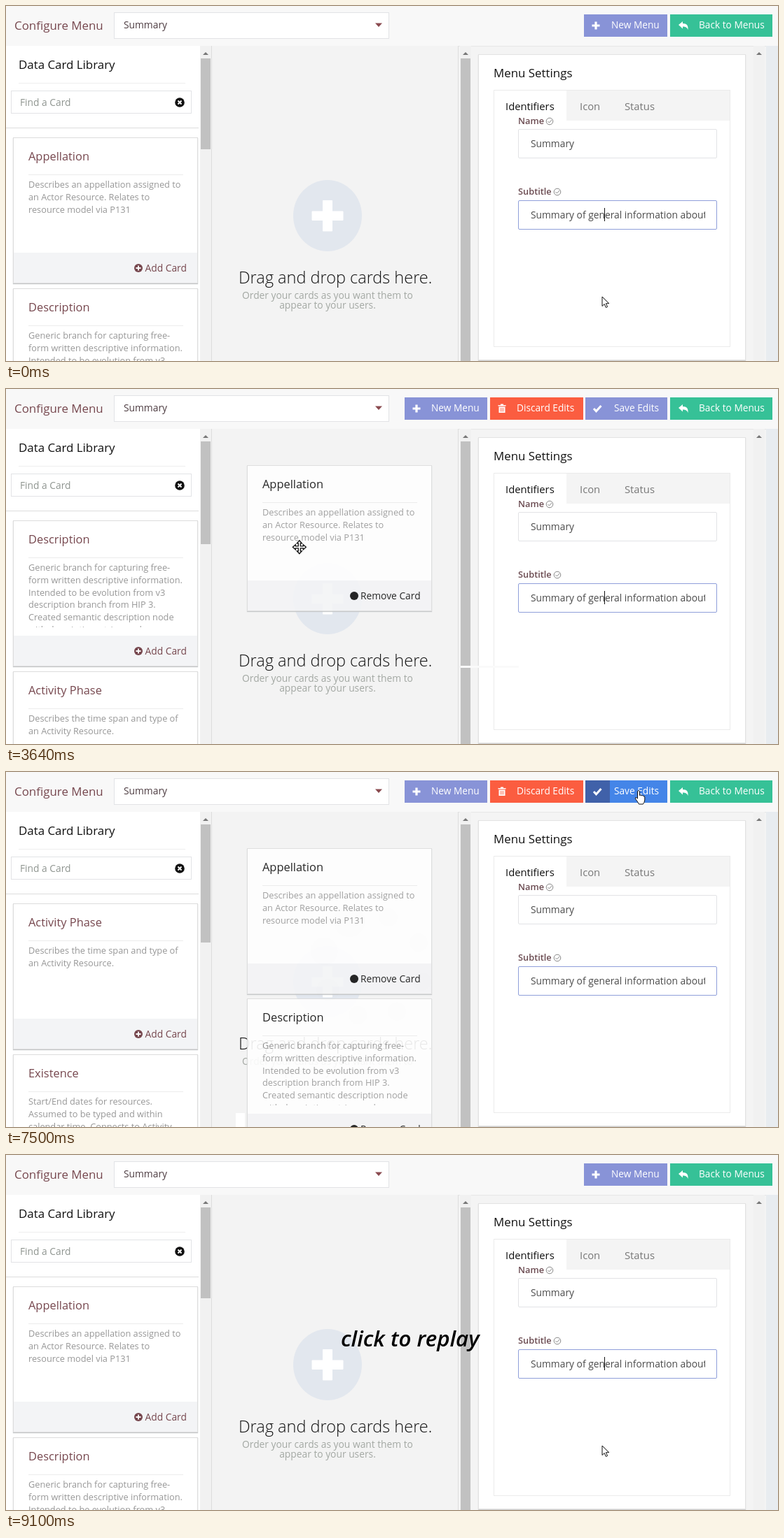
An HTML page that plays this animation: 1102x508 px, repeating every 9.16 s.

```html
<!DOCTYPE html>
<html lang="en">
<head>
<meta charset="utf-8">
<title>Configure Menu</title>
<style>
html, body { margin: 0; width: 100%; height: 100%; overflow: hidden; }
#stage {
  --ink: #111; --brand: #76474e; --dim: #979797;
  position: relative; width: 1102px; height: 508px; overflow: hidden;
  background: #f4f4f4; color: var(--ink); font-family: "Open Sans", sans-serif;
}
#stage.busy { --ink: #640c18; --brand: #640c18; --dim: #858585; }
#stage div, #stage svg { position: absolute; box-sizing: border-box; }
#stage svg { overflow: visible; }
.t { white-space: nowrap; transform: translateY(-50%); line-height: 1.4; }
.field { background: #fff; border: 1px solid #e2e3e6; }
.busy .field { border-color: #f3f3f3; }
.card {
  left: 0; top: 0; width: 264px; height: 209px; background: #fff;
  border: 1px solid #dcdcdc; box-shadow: 0 1px 1px #c4c6c8;
  --title: var(--brand);
}
.busy .card { border-color: #f3f3f3; }
.card.hot { --title: var(--ink); }
.card.dropped { opacity: .9; }
.card .t { color: var(--title); }
.body {
  left: 21px; top: 58px; width: 240px; height: 94px; overflow: hidden;
  font-size: 12.75px; line-height: 17.8px; white-space: pre; color: var(--dim);
}
.foot { left: 0; bottom: 0; width: 100%; height: 43px; background: #f3f4f6; }
.card .remove, .card.dropped .add { display: none; }
.card.dropped .remove { display: block; }
.btn { top: 12px; height: 32px; background: var(--c); color: #fff; }
.btn .icon { left: 0; top: 0; height: 32px; background: var(--i, transparent); }
.blue { --c: #8893d7; }
.red { --c: #fb5d40; }
.green { --c: #36c197; }
.save.hover { --c: #4485e8; --i: #4061a9; }
.busy .blue { --c: #7fbfd7; --i: #4a6bd2; }
.busy .red { --c: #f2964f; --i: #ec8b47; }
.busy .green { --c: #42ebbb; }
.busy .btn { color: #c8cccc; }
#veil { inset: 0; background: rgba(128, 128, 128, .45); }
</style>
</head>
<body>
<div id="stage"></div>
<script>
const LOOP = 9160;
const stage = document.getElementById('stage');

const box = (x, y, w, h, css, inner = '', attrs = '') =>
  `<div ${attrs} style="left:${x}px;top:${y}px;width:${w}px;height:${h}px;${css}">${inner}</div>`;
const fill = (x, y, w, h, color, attrs) => box(x, y, w, h, `background:${color}`, '', attrs);
const text = (x, y, size, str, css = '', attrs = '') =>
  `<div class="t" ${attrs} style="left:${x}px;top:${y}px;font-size:${size}px;${css}">${str}</div>`;
const svg = (x, y, shapes, attrs = '') =>
  `<svg ${attrs} width="1" height="1" style="left:${x}px;top:${y}px">${shapes}</svg>`;
const path = (d, paint) => `<path d="${d}" ${paint}/>`;

const ICON = {
  plus: path('M-1.6-5.5h3.2v3.9h3.9v3.2h-3.9v3.9h-3.2v-3.9h-3.9v-3.2h3.9z', 'fill="#fff"'),
  trash: path('M-5.5-5h3.5v-1.5h4V-5h3.5v1.5h-11zM-4.5-2.5h9V6h-9z', 'fill="#fff"') +
    path('M-2-1V4.5M0-1V4.5M2-1V4.5', 'stroke="#fb5d40" stroke-width=".8"'),
  check: path('M-5 0L-1.5 3.8 5.5-4', 'fill="none" stroke="#fff" stroke-width="3"'),
  reply: path('M-7-1L-1-6v3C5-3 7 0 6.5 6 5 2.5 3 1.5-1 1.5V4.5z', 'fill="#fff"')
};

function button(x, w, color, icon, label, pad) {
  return `<div class="btn ${color}" style="left:${x}px;width:${w}px">` +
    `<div class="icon" style="width:${pad - 6}px"></div>` +
    svg(icon === 'reply' ? 19 : 17, 15.5, ICON[icon]) + text(pad, 15, 13.7, label) + '</div>';
}

function scrollbar(x, attrs) {
  return fill(x, 57, 16, 451, '#f1f1f1') +
    svg(x + 8, 68, path('M-4 2L0-2 4 2z', 'fill="#777"')) +
    (attrs ? fill(x + 1, 75, 14, 433, '#c1c1c1', attrs) : '');
}

function card(id, title, body) {
  const action = (x, label, cls, mark) =>
    `<div class="${cls}">${svg(x, 186, `<circle r="6" fill="var(--title)"/>${mark}`)}` +
    `${text(x + 9.5, 186, 13.8, label)}</div>`;
  const plus = path('M-3.5 0h7M0-3.5v7', 'stroke="#fff" stroke-width="1.8"');
  return `<div class="card" id="${id}">${text(21, 25.5, 16.4, title)}` +
    fill(21, 52, 221, 1, '#ececec') + `<div class="body">${body}</div><div class="foot"></div>` +
    action(178, 'Add Card', 'add', plus) + action(151.5, 'Remove Card', 'remove', '') + '</div>';
}

const tick = (x, y) => svg(x, y, '<circle r="4.8" fill="none" stroke="#888"/>' +
  path('M-2.5 0l2 2 3.5-4', 'fill="none" stroke="#888"'));
const label = (y, str, iconX) =>
  text(731, y, 12.8, str, 'font-weight:600;color:#6a4a50') + tick(iconX, y);

const header = fill(0, 0, 1102, 57, '#f8f8f8') + fill(0, 57, 1102, 1, '#e6e6e6') +
  text(12, 27.5, 16.9, 'Configure Menu', 'color:var(--brand)') +
  box(154, 9, 393, 38, '', text(13, 17, 13.8, 'Summary', 'color:#4c3b40') +
    svg(376.5, 17, path('M-5-2.5H5L0 3z', 'fill="#8a4a4f"')), 'class="field"');

const library = fill(0, 57, 277, 451, '#fff') + text(18, 83.5, 16.9, 'Data Card Library') +
  fill(18, 110, 238, 1, '#eee') +
  box(7, 121, 258, 33, '', text(12, 16, 13.8, 'Find a Card', 'color:#8f9590') +
    svg(240, 16, '<circle r="6.8" fill="var(--ink)"/>' +
      path('M-2.5-2.5l5 5M2.5-2.5l-5 5', 'stroke="#fff" stroke-width="1.9"')), 'class="field"') +
  fill(0, 174, 275, 1, '#ddd') + scrollbar(277, 'id="thumb"') + fill(293, 57, 1, 451, '#ddd');

const hint = (y, str) =>
  text(459, y, 13.8, str, 'color:#a3a8a3;transform:translate(-50%,-50%)');
const dropArea = fill(294, 57, 352, 451, '#f3f3f3') +
  svg(459, 300, '<ellipse rx="49" ry="51" fill="#e2e7ee"/>' +
    path('M-6.5-21.5h13v15.5h15.5v12.5h-15.5v15.5h-13v-15.5h-15.5v-12.5h15.5z',
      'fill="#fff" stroke="#fff" stroke-linejoin="round"')) +
  text(332, 388, 23.5, 'Drag and drop cards here.', 'font-weight:300') +
  hint(413.5, 'Order your cards as you want them to') + hint(428, 'appear to your users.') +
  fill(645, 57, 1, 451, '#ddd') + scrollbar(648, 'class="full"');

const settings = scrollbar(1067) + fill(1085, 57, 17, 451, '#e8ecf0') +
  box(674, 69, 382, 438, 'background:#fff;border:1px solid #e2e2e2;box-shadow:0 1px 1px #d0d0d0') +
  text(696, 95.5, 16.9, 'Menu Settings') +
  box(696, 120, 338, 368, 'border:1px solid #ebebeb') +
  fill(800, 121, 233, 43, '#f4f4f4') +
  text(713, 143, 14.8, 'Identifiers') + text(819, 143, 14.8, 'Icon', 'color:#777') +
  text(883, 143, 14.8, 'Status', 'color:#777') +
  label(165, 'Name', 776) + label(266, 'Subtitle', 787) +
  box(731, 176, 284, 42, 'border-radius:2px', text(17, 20, 13.8, 'Summary', 'color:#4a4a4a'), 'class="field"') +
  box(731, 278, 284, 42, 'border-radius:2px',
    box(17, 0, 249, 40, 'overflow:hidden',
      text(0, 20, 13.8, 'Summary of general information about', 'color:#4a4a4a')),
    'class="field" id="subtitle"') +
  fill(854, 289, 1, 19, '#111', 'id="caret"');

const cards =
  card('phase', 'Activity Phase', 'Describes the time span and type of\nan Activity Resource.') +
  card('existence', 'Existence', 'Start/End dates for resources.\nAssumed to be typed and within\ncalendar time. Connects to Activity') +
  card('appellation', 'Appellation', 'Describes an appellation assigned to\nan Actor Resource. Relates to\nresource model via P131') +
  card('description', 'Description', 'Generic branch for capturing free-\nform written descriptive information.\nIntended to be evolution from v3\ndescription branch from HIP 3.\nCreated semantic description node\nwith description, string and person');

const cursors =
  svg(0, 0, path('M0 0V13.5L3.2 10.5 5.4 15.5 7.6 14.5 5.4 9.7H9.7z', 'fill="#fff" stroke="#111"'), 'id="arrow"') +
  svg(0, 0, path('M0-9.5l3.5 4h-2v4h4v-2l4 3.5-4 3.5v-2h-4v4h2L0 9.5l-3.5-4h2v-4h-4v2l-4-3.5 4-3.5v2h4v-4h-2z',
    'fill="#fff" stroke="#111" stroke-width="1.3"'), 'id="move"') +
  svg(0, 0, path('M-1.5 1.5q1.5-2 3 0v6q1.5-1.5 2.8.3 1.5-1 2.6.7 1.9-.4 1.9 1.5v4q-.5 4-2.5 6H.5q-2-4-5-7.5-.7-2.3 1.5-1.9l1.5 1.5z',
    'fill="#fff" stroke="#111"'), 'id="hand"');

stage.innerHTML = header + library + dropArea + settings + fill(649, 396, 83, 3, '#fafafa', 'id="streak"') +
  cards + fill(328, 488, 277, 20, '#fff', 'id="patch"') +
  '<div id="veil"></div>' +
  svg(523.5, 277.5, '<circle fill="rgba(112,112,112,.6)"/>'.repeat(8), 'id="spinner"') +
  '<div id="plain">' + button(825, 119, 'blue', 'plus', 'New Menu', 39) + '</div>' +
  '<div id="edits">' + button(569, 118, 'blue', 'plus', 'New Menu', 38) +
  button(691, 133, 'red', 'trash', 'Discard Edits', 38) +
  button(827, 117, 'blue save', 'check', 'Save Edits', 41) + '</div>' +
  button(948, 146, 'green', 'reply', 'Back to Menus', 41) +
  text(478, 263, 31.3, 'click to replay', 'font-weight:600;font-style:italic;color:#000', 'id="replay"') +
  cursors;

const el = {};
stage.querySelectorAll('[id]').forEach(e => el[e.id] = e);
const dots = [...el.spinner.children];
const saveBtn = stage.querySelector('.save');

// Keys are [time, x, y, eased]; the flag smooths the approach to that key.
const PATHS = {
  cursor: [[0, 851, 416], [300, 851, 416], [900, 186, 284, 1], [1690, 186, 284], [1900, 306, 246],
    [2200, 506, 189], [2270, 524, 198], [2410, 526, 202], [3480, 526, 202], [3920, 173, 282, 1],
    [4640, 173, 282], [4860, 221, 310], [5200, 393, 384], [5500, 498, 424], [6180, 498, 424],
    [7050, 903, 26, 1], [8100, 903, 26], [8780, 849, 404, 1], [9100, 849, 404], [9100, 851, 416]],
  appellation: [[1690, 10, 188], [1900, 130, 150], [2200, 330, 93], [2270, 348, 102],
    [2410, 350, 106], [2660, 350, 106], [2660, 344, 109]],
  description: [[4640, 10, 188], [4860, 58, 216], [5200, 230, 290], [5500, 341, 335],
    [5720, 341, 335], [5720, 344, 324]]
};
const HIDDEN_CARET = [[350, 880], [1380, 1900], [2950, 3480], [3920, 4500], [5960, 6480], [7010, 9100]];

const within = (t, a, b) => t >= a && t < b;
const clamp = v => Math.min(1, Math.max(0, v));
const show = (e, on) => { e.style.display = on ? 'block' : 'none'; };
const place = (e, [x, y]) => { e.style.transform = `translate(${x}px,${y}px)`; };

function follow(keys, t) {
  const next = keys.findIndex(k => k[0] > t);
  if (next < 0) return keys[keys.length - 1].slice(1, 3);
  if (next === 0) return keys[0].slice(1, 3);
  const a = keys[next - 1], b = keys[next];
  let p = (t - a[0]) / (b[0] - a[0]);
  if (b[3]) p = p * p * (3 - 2 * p);
  return [a[1] + (b[1] - a[1]) * p, a[2] + (b[2] - a[2]) * p];
}

// Places every card and tells whether the pointer is over one.
function drawCards(t, point) {
  const taken = t >= 9100 || t < 1690 ? 0 : t < 4640 ? 1 : 2;
  const gap = within(t, 1690, 1900) || within(t, 4640, 5000) ? 8 : 0;
  const over = ([x, y]) => within(point[0], x, x + 264) && within(point[1], y, y + 209);
  let hit = false;
  ['appellation', 'description', 'phase', 'existence'].forEach((id, i) => {
    const out = i < taken;
    const pos = out ? follow(PATHS[id], t) : [10, 188 + 216 * (i - taken) + gap];
    const hot = over(pos);
    hit = hit || hot;
    place(el[id], pos);
    el[id].classList.toggle('hot', out || hot);
    el[id].classList.toggle('dropped', out && t >= [2660, 5720][i]);
  });
  el.thumb.style.height = [130, 147, 169][taken] + 'px';
  return hit;
}

function drawSpinner(t) {
  dots.forEach((dot, i) => {
    const a = (11.5 + (t - 7860) * .36 - 45 * i) * Math.PI / 180;
    dot.setAttribute('cx', 73 * Math.cos(a));
    dot.setAttribute('cy', 73 * Math.sin(a));
    dot.setAttribute('r', Math.max(13.5, 23 - 3.2 * i));
  });
}

function render(t) {
  const point = follow(PATHS.cursor, t);
  const hit = drawCards(t, point);

  const kind = within(t, 6950, 8160) ? 'hand'
    : hit && !within(t, 5500, 5990) && !within(t, 2610, 2710) ? 'move' : 'arrow';
  ['arrow', 'move', 'hand'].forEach(k => { show(el[k], k === kind); place(el[k], point); });

  const editing = within(t, 2710, 7940);
  show(el.edits, editing);
  show(el.plain, !editing);
  saveBtn.classList.toggle('hover', t >= 7000);

  const loading = within(t, 7500, 7940);
  const busy = within(t, 7700, 7940);
  stage.classList.toggle('busy', busy);
  show(el.veil, loading);
  show(el.spinner, loading);
  el.veil.style.opacity = el.spinner.style.opacity = clamp((t - 7500) / 300);
  drawSpinner(t);

  show(el.caret, !HIDDEN_CARET.some(([a, b]) => within(t, a, b)));
  el.subtitle.style.borderColor = within(t, 7700, 9100) ? '' : '#8f9fda';
  show(el.streak, within(t, 2100, 6200));
  show(el.patch, within(t, 5500, 7700));
  el.patch.style.width = t < 5720 ? '277px' : '13px';
  show(el.replay, t >= 9100);
}

const start = performance.now();
function frame() {
  render((performance.now() - start) % LOOP);
  requestAnimationFrame(frame);
}
render(0);
requestAnimationFrame(frame);
</script>
</body>
</html>
```
